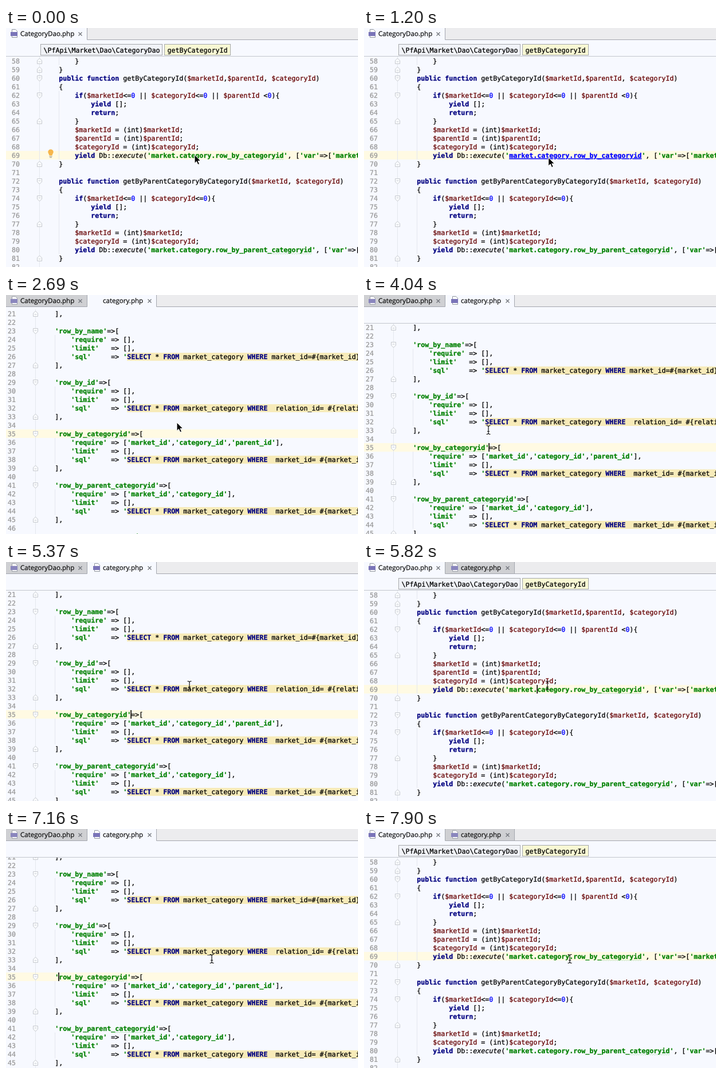
Write an HTML page that moves like this. It is 614 px wide and 418 px high and loops after 8000 ms.

```html
<!DOCTYPE html>
<html lang="en">
<head>
<meta charset="utf-8">
<title>Jump to definition</title>
<style>
html, body { margin: 0; width: 100%; height: 100%; overflow: hidden; background: #f7f9ff; }
svg { display: block; width: 614px; height: 418px; }
text { white-space: pre; text-rendering: geometricPrecision; }
.code { font: 11.64px "DejaVu Sans Mono", "Liberation Mono", monospace; --ink: #000; }
.code text, .code tspan { fill: var(--ink); stroke: var(--ink); stroke-width: .28px; }
.code .num { --ink: #999; }
.key { --ink: #000080; font-weight: bold; }
.str { --ink: #008000; font-weight: bold; }
.var { --ink: #660000; }
.int { --ink: #0000ff; }
.call { font-style: italic; }
.link { --ink: #0000ff; text-decoration: underline 1px; text-underline-offset: 1px; }
.tab { font: 11.55px "Open Sans", "Noto Sans", sans-serif; fill: #111; }
.tab text { stroke: #111; stroke-width: .25px; }
.wave { fill: none; stroke: #b4dcb4; stroke-width: .8; }
.fold { fill: #fafcff; stroke: #c6c9ce; stroke-width: 1; }
.guide { fill: none; stroke: #e4e7ee; }
</style>
</head>
<body>
<svg id="stage" viewBox="0 0 614 418"></svg>
<script>
const LOOP = 8000, CHAR = 7.007, ROW = 15;
const stage = document.getElementById('stage');
const $ = id => document.getElementById(id);

const daoLines = [
  [120, '}'],
  [92, '}'],
  [92, 'public function getByCategoryId($marketId,$parentId, $categoryId)'],
  [92, '{'],
  [120, 'if($marketId<=0 || $categoryId<=0 || $parentId <0){'],
  [148, 'yield [];'],
  [148, 'return;'],
  [120, '}'],
  [120, '$marketId = (int)$marketId;'],
  [120, '$parentId = (int)$parentId;'],
  [120, '$categoryId = (int)$categoryId;'],
  [120, "yield Db::execute('market.category.row_by_categoryid', ['var'=>['market"],
  [92, '}'],
  [92, ''],
  [92, 'public function getByParentCategoryByCategoryId($marketId, $categoryId)'],
  [92, '{'],
  [120, 'if($marketId<=0 || $categoryId<=0){'],
  [148, 'yield [];'],
  [148, 'return;'],
  [120, '}'],
  [120, '$marketId = (int)$marketId;'],
  [120, '$categoryId = (int)$categoryId;'],
  [120, "yield Db::execute('market.category.row_by_parent_categoryid', ['var'=>["],
  [92, '}'],
  [92, '']
];

const entry = (name, needs, where) => [
  [85, `'${name}'=>[`],
  [113, `'require' => [${needs}],`],
  [113, "'limit'   => [],"],
  [113, `'sql'     => 'SELECT * FROM market_category WHERE ${where}`],
  [85, '],'],
  [85, '']
];
const sqlLines = [
  [85, '],'], [85, ''],
  ...entry('row_by_name', '', 'market_id=#{market_id}'),
  ...entry('row_by_id', '', ' relation_id= #{relation_id}'),
  ...entry('row_by_categoryid', "'market_id','category_id','parent_id'", ' market_id= #{market_id}'),
  ...entry('row_by_parent_categoryid', "'market_id','category_id'", ' market_id= #{market_id}'),
  [85, "'row_by_parent_relation'=>["]
];

const esc = s => s.replace(/&/g, '&amp;').replace(/</g, '&lt;').replace(/>/g, '&gt;');
const span = (cls, s) => `<tspan class="${cls}">${esc(s)}</tspan>`;

function paint(code) {
  const rule = /'[^']*'?|\$\w+|\b(?:public|function|if|yield|return)\b|\bexecute\b|\b\d+\b/g;
  let out = '', at = 0;
  for (const m of code.matchAll(rule)) {
    const s = m[0];
    out += esc(code.slice(at, m.index));
    at = m.index + s.length;
    if (s.startsWith("'SELECT"))
      out += span('str', "'") + esc(s.slice(1)).replace(/SELECT|FROM|WHERE/g, w => span('key', w));
    else if (s === "'market.category.row_by_categoryid'")
      out += span('str', "'") + `<tspan id="target" class="str">${s.slice(1, -1)}</tspan>` + span('str', "'");
    else {
      const cls = s[0] === "'" ? 'str' : s[0] === '$' ? 'var' : s === 'execute' ? 'call' : /\d/.test(s) ? 'int' : 'key';
      out += span(cls, s);
    }
  }
  return out + esc(code.slice(at));
}

function wave(x, y, n, id) {
  let d = `M${x} ${y + 3.4}`;
  for (let i = 1; i <= n * CHAR / 2; i++) d += `L${x + i * 2} ${y + (i % 2 ? 2 : 3.4)}`;
  return `<path ${id ? `id="${id}"` : ''} class="wave" d="${d}"/>`;
}

function fold(x, y, opens) {
  const k = opens ? 1 : -1, c = y - 4;
  return `<path class="fold" d="M${x - 4} ${c - 4.5 * k}h8v${5.5 * k}l-4 ${4 * k}l-4 ${-4 * k}zM${x - 2} ${c - k}h4"/>`;
}

// The first baseline is at y = 0 of the listing's own group.
function listing(lines, first, numX, foldX, active, isOpen, isEnd) {
  const left = Math.min(...lines.map(l => l[0]));
  let out = `<rect y="${(active - first) * ROW - 12}" width="614" height="15" fill="#fffae3"/>
    <path class="guide" d="M${foldX + .5} -40V400"/>`;
  lines.forEach(([x, code], i) => {
    const y = i * ROW, sql = code.indexOf("'SELECT"), typo = code.indexOf('categoryid');
    if (x > left) out += `<path class="guide" d="M${left + .5} ${y - 12}v15"/>`;
    if (sql > 0) out += `<rect x="${x + (sql + 1) * CHAR}" y="${y - 11}" width="440" height="14" fill="#f7ebb9"/>`;
    if (typo > 0) out += wave(x + typo * CHAR, y, 10, first + i === 69 ? 'typo' : '');
    if (isOpen(code)) out += fold(foldX + .5, y, true);
    if (isEnd(code)) out += fold(foldX + .5, y, false);
    out += `<text class="num" x="${numX}" y="${y}">${first + i}</text><text x="${x + .2}" y="${y}">${paint(code)}</text>`;
  });
  return out;
}

const icon = (x, id) => `<g id="${id}"><path d="M${x + 2.5} 2.5h6l3 3v11h-9z" fill="#fff" stroke="#8f959e"/>
  <rect x="${x}" y="7" width="12" height="7" fill="#7a74b8"/></g>`;
const cross = x => `<path d="M${x - 3} 7.5l6 6m0-6l-6 6" stroke="#70737a" stroke-width="1.3"/>`;
const crumb = (x, w, fill, label) =>
  `<rect x="${x + .5}" y="28.5" width="${w}" height="19" fill="${fill}" stroke="#a6a8ab"/>
   <text x="${x + 5.5}" y="43">${label}</text>`;

stage.innerHTML = `
<defs><clipPath id="view"><rect id="viewBox" width="614" height="400"/></clipPath></defs>
<rect width="614" height="418" fill="#f7f9ff"/>
<g class="code" clip-path="url(#view)">
  <g id="dao" transform="translate(0 62)">${listing(daoLines, 58, 10, 58, 69,
    c => /^public|^if/.test(c), c => c === '}')}</g>
  <g id="sql">${listing(sqlLines, 21, 3, 51, 35, c => c.startsWith("'row_by"), c => c === '],')}</g>
  <rect id="caret" width="1.6" height="15" fill="#000"/>
</g>
<rect width="614" height="20" fill="#ececee"/>
<rect id="tab1" width="141" height="21"/>
<rect id="tab2" x="142" width="120" height="21"/>
<path id="tabEdge" stroke="#a4a7ae" fill="none"/>
<g class="tab">${icon(8, 'icon1')}<text x="25" y="14">CategoryDao.php</text>${cross(129.5)}
  <g id="second">${icon(152, 'icon2')}<text x="169" y="14">category.php</text>${cross(250.5)}</g></g>
<path id="bar" d="M0 49.5H614" stroke="#c3c6cc"/>
<g id="crumbs" class="code">
  ${crumb(60, 212, '#f1f3f8', '\\PfApi\\Market\\Dao\\CategoryDao')}
  ${crumb(276, 115, '#f8f8d4', 'getByCategoryId')}</g>
<g id="bulb"><path d="M75.5 223C75.5 220.5 73.3 219.5 73.3 216.7A4.7 4.5 0 0 1 82.7 216.7C82.7 219.5 80.5 220.5 80.5 223Z" fill="#f6b64c"/>
  <path d="M75.5 224.5h5M76 226.5h4" stroke="#a39a86"/></g>
<path id="arrow" d="M0 0V14.5L3.4 11.4L5.8 17L8.4 15.9L6 10.5H10.6Z" fill="#000" stroke="#fff" stroke-width="1"/>
<path id="beam" d="M-3.5 -7.5H-1.5L0 -6L1.5 -7.5H3.5M0 -6V6M-3.5 7.5H-1.5L0 6L1.5 7.5H3.5M-2 2.5H2" fill="none" stroke="#111" stroke-width="1.2"/>`;

// start, end, steps, x, y
const moves = [
  [1050, 1350, 3, 318, 229],
  [1800, 2100, 3, 298, 223],
  [3440, 3590, 2, 217, 245],
  [4040, 4040, 1, 217, 236],
  [4330, 4780, 4, 226, 279],
  [4930, 5370, 4, 320, 216],
  [6270, 6570, 3, 359, 227]
];

function pointer(t) {
  let x = 329, y = 222;
  for (const [a, b, n, tx, ty] of moves) {
    if (t < a) break;
    const k = b > a ? Math.min(n, Math.floor((t - a) / (b - a) * (n - 1) + 1e-6) + 1) / n : 1;
    x += (tx - x) * k;
    y += (ty - y) * k;
  }
  return `translate(${x.toFixed(1)} ${y.toFixed(1)})`;
}

const within = (t, a, b) => t >= a && t < b;
const show = (id, on) => $(id).setAttribute('display', on ? 'inline' : 'none');
const set = (id, name, v) => $(id).setAttribute(name, v);

function render(t) {
  const early = within(t, 2690, 5820), late = within(t, 6720, 7900);
  const sql = early || late, opened = t >= 2690;
  const strip = !within(t, 2690, 4040);
  const base = late ? 53 : strip ? 61 : 37;
  const link = within(t, 1050, 1350) || within(t, 1800, 2690);

  show('dao', !sql);
  show('sql', sql);
  set('sql', 'transform', `translate(0 ${base})`);
  set('viewBox', 'y', strip ? 50 : 25);
  show('bar', strip);
  show('crumbs', !sql);
  show('bulb', t < 1050);
  set('target', 'class', link ? 'str link' : 'str');
  show('typo', !link);

  set('tab1', 'fill', sql ? '#cfd0d3' : '#f7f9ff');
  set('tab2', 'fill', sql ? '#f7f9ff' : '#cfd0d3');
  show('tab2', opened);
  show('second', opened);
  show('icon2', t >= 2990);
  set('icon1', 'opacity', sql ? .8 : 1);
  set('icon2', 'opacity', sql ? 1 : .8);
  set('tabEdge', 'd', (sql ? 'M0 20.5H141.5M262.5 20.5H614' : 'M141.5 20.5H614') +
    'M141.5 0V20.5' + (opened ? 'M262.5 0V20.5' : ''));

  const inDao = within(t, 5820, 6570), inSql = within(t, 3590, 5820);
  show('caret', inDao || inSql || late);
  set('caret', 'x', inDao ? 301.3 : late ? 91.2 : 217.3);
  set('caret', 'y', inDao ? 215 : base + 14 * ROW - 12);

  const at = pointer(t);
  show('arrow', t < 3440);
  show('beam', t >= 3440);
  set('arrow', 'transform', at);
  set('beam', 'transform', at);
}

const begin = performance.now();
function tick() {
  render((performance.now() - begin) % LOOP);
  requestAnimationFrame(tick);
}
tick();
</script>
</body>
</html>
```
